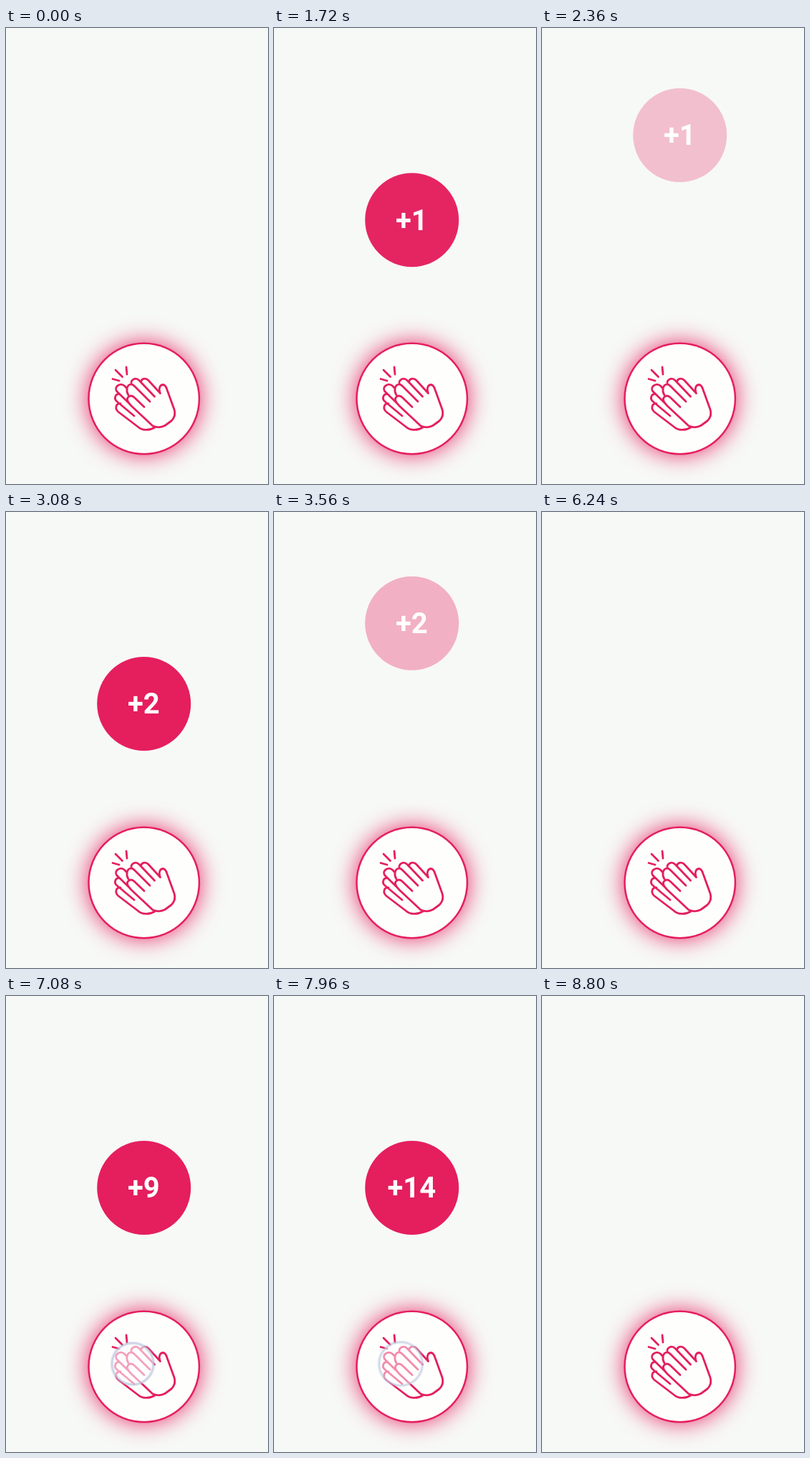
These frames come from a looping animation (366 by 636 pixels, 9680 ms). An HTML page with a canvas:

```html
<!DOCTYPE html>
<html lang="en">
<head>
<meta charset="utf-8">
<title>Clap button</title>
<style>
  html, body { margin: 0; width: 100%; height: 100%; overflow: hidden; background: #f7f9f7; }
  canvas { display: block; width: 366px; height: 636px; }
</style>
</head>
<body>
<canvas id="stage"></canvas>
<script>
const W = 366, H = 636, LOOP = 9680;
const PINK = '#e51e5d';
const CX = 192.7, BUTTON_Y = 517, REST_Y = 267.5, RISE = 130;
const ENTER = 300, HOLD = 638, EXIT = 400, TOUCH = 290;

const canvas = document.getElementById('stage');
const ctx = canvas.getContext('2d');
const dpr = window.devicePixelRatio || 1;
canvas.width = W * dpr;
canvas.height = H * dpr;

// Each burst of taps shares one badge; "first" is the count it opens with.
const bursts = [
  { start: 1430, first: 1, taps: 1, step: 0, x: 152, y: 526 },
  { start: 2655, first: 2, taps: 1, step: 0, x: 152, y: 526 },
  { start: 3860, first: 3, taps: 4, step: 380, x: 152, y: 526 },
  { start: 6600, first: 7, taps: 8, step: 165, x: 177, y: 513 }
];

const hands = new Path2D([
  // sparks
  'M153 477L162.5 486.5M168 473L169 483M149 489.5L158 492',
  // front hand: index finger, thumb and palm
  'M188.5 493.5C189.5 488 196 488 199 491.5L215.5 509.5',
  'C212.5 502 215.5 497.5 219.5 497.5C222.5 498 224 501 225 504.5',
  'L235 532C237 538 235 544 231 548L222 554.5C216 558 210 557 205 555L175 527',
  'C170 522 167.5 517.5 171 514.5C174 512 177 513 179.5 515.5L193 528.5',
  // front hand: middle and ring fingers
  'M175 497C174 489.5 181.5 487 186 491.5L207.5 514',
  'M171 512C167 505.5 169 498 174 497C176 496.5 178 498 180 500L201 521',
  // back hand
  'M169 503L166 499.5C160 494 150.5 500 154.5 506.5L173 524.5',
  'M159 511C153 509 150 517 155 521L179 541',
  'M160 524C153.5 523 151.5 531 157 535.5L184 556C190 561.5 200 562 208 557'
].join(''));

const clamp = v => Math.max(0, Math.min(1, v));
const easeOut = (p, power) => 1 - Math.pow(1 - p, power);

// Index of the latest tap in a burst that has begun.
const tapIndex = (burst, t) =>
  burst.step ? Math.min(burst.taps - 1, Math.floor((t - burst.start) / burst.step)) : 0;

function disc(x, y, r) {
  ctx.beginPath();
  ctx.arc(x, y, r, 0, Math.PI * 2);
}

function drawButton() {
  ctx.save();
  ctx.shadowColor = 'rgba(229,30,93,.92)';
  ctx.shadowBlur = 32 * dpr;
  ctx.fillStyle = PINK;
  disc(CX, BUTTON_Y, 78.5);
  ctx.fill();
  ctx.restore();

  ctx.fillStyle = '#fefefd';
  disc(CX, BUTTON_Y, 76);
  ctx.fill();

  ctx.strokeStyle = PINK;
  ctx.lineWidth = 2.8;
  ctx.lineCap = ctx.lineJoin = 'round';
  ctx.stroke(hands);
}

function drawBadge(burst, t) {
  const end = burst.start + (burst.taps - 1) * burst.step + HOLD;
  if (t < burst.start || t >= end + EXIT) return;

  const enter = clamp((t - burst.start) / ENTER);
  const exit = clamp((t - end) / EXIT);
  const y = REST_Y + RISE * (1 - easeOut(enter, 1.8)) - RISE * easeOut(exit, 1.8);

  ctx.save();
  ctx.globalAlpha = enter * (1 - exit);
  ctx.fillStyle = PINK;
  disc(CX, y, 65.5);
  ctx.fill();
  ctx.globalAlpha = Math.min(enter, clamp((1 - exit) * 4));
  ctx.fillStyle = '#fff';
  ctx.font = '700 40px Roboto, sans-serif';
  ctx.textAlign = 'center';
  ctx.fillText('+' + (burst.first + tapIndex(burst, t)), CX - 0.3, y + 13.8);
  ctx.restore();
}

function drawTouch(burst, t) {
  if (t < burst.start) return;
  const age = t - burst.start - tapIndex(burst, t) * burst.step;
  if (age >= TOUCH) return;

  const appear = clamp(age / 40 + 0.4);
  const fade = clamp((age - 190) / (TOUCH - 190));

  ctx.save();
  ctx.globalAlpha = appear * (1 - fade);
  ctx.fillStyle = 'rgba(255,255,255,.58)';
  disc(burst.x, burst.y, 29 + 8 * fade);
  ctx.fill();
  for (const [width, alpha] of [[5, 0.25], [2.6, 0.6]]) {
    ctx.lineWidth = width;
    ctx.strokeStyle = `rgba(184,196,220,${alpha})`;
    ctx.stroke();
  }
  ctx.restore();
}

function render(t) {
  ctx.setTransform(dpr, 0, 0, dpr, 0, 0);
  ctx.fillStyle = '#f7f9f7';
  ctx.fillRect(0, 0, W, H);
  bursts.forEach(b => drawBadge(b, t));
  drawButton();
  bursts.forEach(b => drawTouch(b, t));
}

const origin = performance.now();
function tick() {
  render((performance.now() - origin) % LOOP);
  requestAnimationFrame(tick);
}
tick();
</script>
</body>
</html>
```
